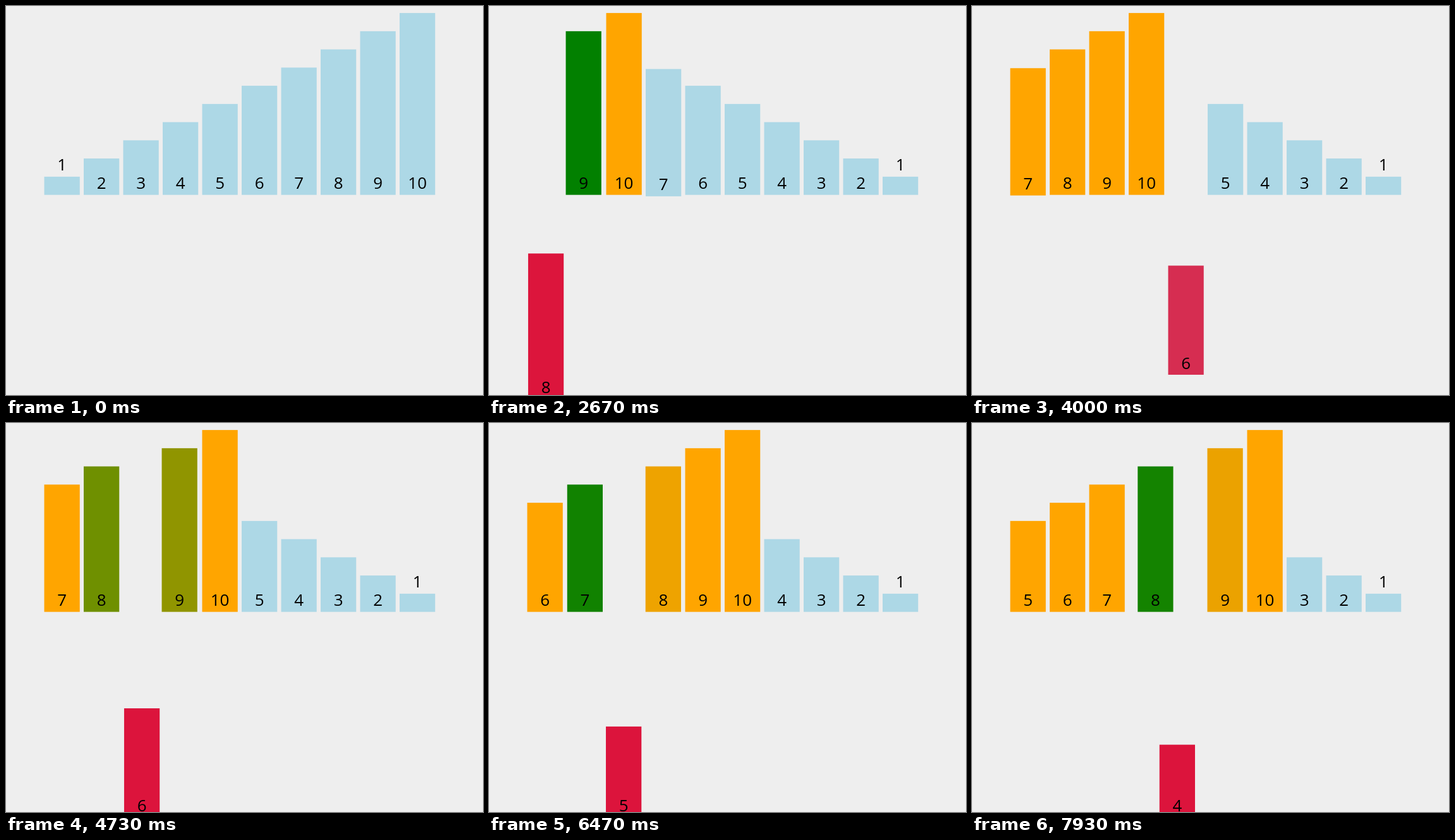
An HTML page with a canvas for the animation above (8000 ms loop, 755 by 615 pixels).

```html
<!DOCTYPE html>
<html lang="en">
<head>
<meta charset="utf-8">
<title>Insertion sort</title>
<style>
  html, body { margin: 0; width: 100%; height: 100%; overflow: hidden; background: #eee; }
  canvas { display: block; }
</style>
</head>
<body>
<canvas id="stage" width="755" height="615"></canvas>
<script>
const ctx = document.getElementById('stage').getContext('2d');

const LOOP = 8000, TRANSITION = 200, COUNT = 10;
const LEFT = 60.5, PITCH = 62.5, BAR_WIDTH = 56.25, UNIT = 28.75;
const FLOOR = 298.6, DROP = 325;

const BLUE = [173, 216, 230], ORANGE = [255, 165, 0];
const GREEN = [0, 128, 0], CRIMSON = [220, 20, 60];

// Step number and start time; steps between these are evenly spaced.
const beats = [
  [-3, 855], [0, 1299], [8, 2476], [9, 2640], [10, 2647], [17, 3700], [18, 3864],
  [26, 5084], [27, 5161], [28, 5254], [36, 6442], [46, 7854], [47, 7995]
];

function stepTime(step) {
  let i = 1;
  while (i < beats.length - 1 && beats[i][0] < step) i++;
  const [s0, t0] = beats[i - 1], [s1, t1] = beats[i];
  return t0 + (t1 - t0) * (step - s0) / (s1 - s0);
}

// Each step lists where every bar is heading, as [x, bottom, value, r, g, b].
function buildSteps() {
  const bars = Array.from({ length: COUNT }, (_, i) =>
    ({ slot: i, value: i + 1, down: false, color: BLUE }));
  const steps = [];
  const record = () => steps.push(bars.map(b =>
    [LEFT + b.slot * PITCH, FLOOR + (b.down ? DROP : 0), b.value, ...b.color]));
  const settleGreen = () => bars.forEach(b => { if (b.color === GREEN) b.color = ORANGE; });

  record();
  bars.forEach((b, i) => b.value = COUNT - i);
  record();
  record();
  bars[0].color = ORANGE;
  record();

  for (let i = 1; i < COUNT; i++) {
    const key = bars[i];
    key.down = true;
    key.color = CRIMSON;
    record();
    for (let j = i - 1; j >= 0; j--) {
      const other = bars.find(b => b.slot === j);
      settleGreen();
      other.color = GREEN;
      record();
      other.slot++;
      key.slot--;
      record();
    }
    settleGreen();
    key.down = false;
    key.color = ORANGE;
    record();
  }
  return steps;
}

const steps = buildSteps();
const starts = steps.map((_, i) => i ? stepTime(i - 4) : 0);

const ease = u => u < 0.5 ? 4 * u ** 3 : 1 - 4 * (1 - u) ** 3;

// A new step takes over from wherever the previous transition had got to.
function poseAt(time) {
  let pose = steps[0], current = 0;
  for (let i = 1; i < steps.length && starts[i] <= time; i++) {
    const end = Math.min(time, starts[i + 1] ?? Infinity);
    const p = ease(Math.min(1, (end - starts[i]) / TRANSITION));
    pose = pose.map((bar, b) => bar.map((v, k) => v + (steps[i][b][k] - v) * p));
    current = i;
  }
  return { pose, labels: steps[current].map(bar => bar[2]) };
}

function draw(time) {
  const { pose, labels } = poseAt(time);
  ctx.fillStyle = '#eee';
  ctx.fillRect(0, 0, 755, 615);
  ctx.font = '26px "Open Sans", "Noto Sans", sans-serif';
  ctx.textAlign = 'center';
  pose.forEach(([x, bottom, value, ...rgb], i) => {
    const height = value * UNIT;
    ctx.fillStyle = `rgb(${rgb.map(Math.round)})`;
    ctx.fillRect(x, bottom - height, BAR_WIDTH, height);
    const lift = Math.max(0, 2 - value) * UNIT;
    ctx.fillStyle = '#000';
    ctx.fillText(labels[i], x + BAR_WIDTH / 2, bottom - 9.4 - lift);
  });
}

const begin = performance.now();
function frame() {
  draw((performance.now() - begin) % LOOP);
  requestAnimationFrame(frame);
}
frame();
</script>
</body>
</html>
```
